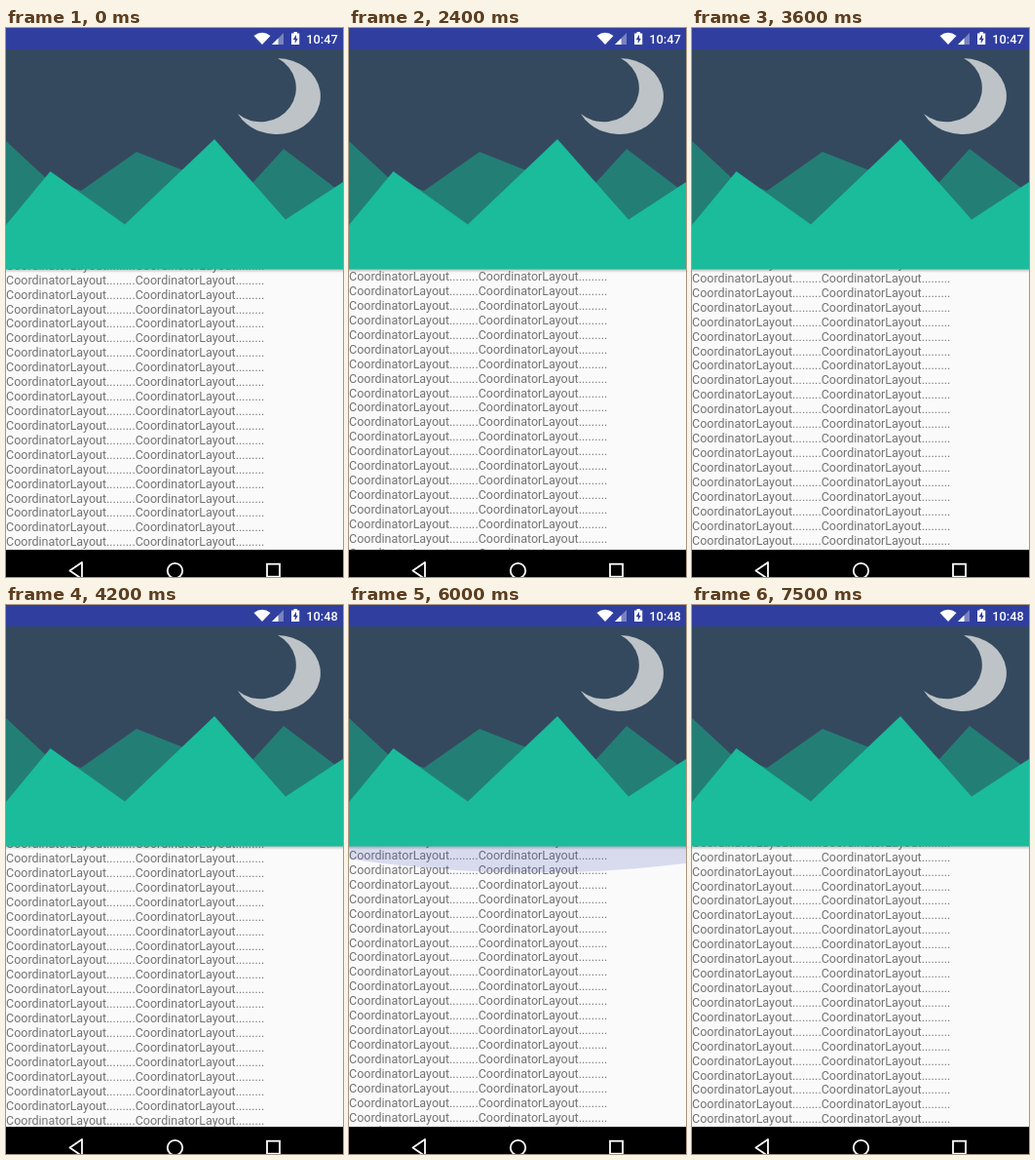
Animation, 346 px wide and 563 px high, one loop 8.7 s. Source, as an HTML page:

```html
<!DOCTYPE html>
<html lang="en">
<head>
<meta charset="utf-8">
<title>Scrolling list under a fixed header</title>
<style>
  html, body { margin: 0; width: 100%; height: 100%; overflow: hidden; background: #fafafa; }
  svg { display: block; width: 346px; height: 563px; }
  text { font-family: Roboto, sans-serif; white-space: pre; }
  #rows text { font-size: 12.5px; fill: #737373; }
</style>
</head>
<body>
<svg viewBox="0 0 346 563">
  <defs>
    <clipPath id="view"><rect y="247" width="346" height="288"/></clipPath>
    <linearGradient id="fade" x2="0" y2="1">
      <stop offset="0" stop-color="#000" stop-opacity=".26"/>
      <stop offset="1" stop-color="#000" stop-opacity="0"/>
    </linearGradient>
  </defs>
  <rect width="346" height="563" fill="#fafafa"/>

  <g clip-path="url(#view)">
    <g id="rows"></g>
    <ellipse id="glow" cx="190" rx="519" fill="#3f51b5"/>
  </g>
  <rect y="247" width="346" height="4" fill="url(#fade)"/>

  <!-- header picture -->
  <rect y="21" width="346" height="226" fill="#34495e"/>
  <path fill="#bdc3c7" d="M279 31A45 39 0 1 1 238 88A36.300 34.800 0 1 0 279 31Z"/>
  <path fill="#237f76" d="M0 116L40 153L77 167L134 127L182 146L254 158L285 124L346 170V247H0Z"/>
  <path fill="#1abc9c" d="M0 202L45.500 147L122 201.500L214 114L287 196.500L346 158V247.500H0Z"/>

  <!-- status bar -->
  <rect width="346" height="22" fill="#303f9f"/>
  <g fill="#fff">
    <path d="M254.500 8Q263 1.500 271.500 8L263 17Z"/>
    <path d="M285 5V17H273Z" opacity=".35"/>
    <path d="M279.500 10.500V17H273Z"/>
    <path d="M295.500 4h3.500v1.500h2.200v11.500h-8.200v-11.500h2.500Z"/>
    <path d="M298 6.800L294.700 12H296.700V16L299.800 10.700H298Z" fill="#303f9f"/>
    <text id="clock" x="308.300" y="15.800" font-size="12.8" font-weight="500"></text>
  </g>

  <!-- navigation bar -->
  <rect y="535.150" width="346" height="28" fill="#000"/>
  <g fill="none" stroke="#fff" stroke-width="1.8">
    <path d="M78 548V565L65.500 556.500Z" stroke-linejoin="round"/>
    <circle cx="173.500" cy="556.500" r="7.700"/>
    <rect x="268" y="549.700" width="13" height="13"/>
  </g>
</svg>
<script>
const LOOP = 8700, STEP = 100, PITCH = 14.92, BASE = 262.7;
const TOP = 247, BOTTOM = 535, RADIUS = 519, HEIGHT = 69.5;
const $ = id => document.getElementById(id);

// start ms, end ms, distance from the end of the list on arrival
const flings = [
  [2200, 2700, 157.7],
  [3000, 3900, 565.8],
  [3900, 4800, 1000],
  [4800, 5500, 1413.4],
  [5700, 6000, 1505.2],
  [6000, 6600, 0]
];

const glows = [
  { start: 1300, end: 2200, size: .69, alpha: .14, bottom: true },
  { start: 5800, end: 6300, size: .4, alpha: .185, bottom: false },
  { start: 6600, end: 7500, size: .69, alpha: .14, bottom: true }
];

const rows = Array.from({ length: 22 }, () => {
  const row = document.createElementNS("http://www.w3.org/2000/svg", "text");
  row.textContent = ("CoordinatorLayout" + ".".repeat(9)).repeat(2);
  return $("rows").appendChild(row);
});

const progress = (t, start, end) => Math.min(1, Math.max(0, (t - start) / (end - start)));
const easeOut = p => 1 - (1 - p) ** 2;

function scrollAt(t) {
  return flings.reduce((pos, [start, end, to]) =>
    pos + (to - pos) * easeOut(progress(t, start, end)), 0);
}

function drawGlow(t) {
  const glow = glows.find(g => t > g.start && t < g.end);
  $("glow").setAttribute("opacity", 0);
  if (!glow) return;
  // quick swell, slow fade
  const swell = Math.sin(Math.PI * progress(t, glow.start, glow.end) ** .65);
  const scale = glow.size * swell, depth = scale * (HEIGHT - RADIUS);
  $("glow").setAttribute("ry", RADIUS * scale);
  $("glow").setAttribute("cy", glow.bottom ? BOTTOM - depth : TOP + depth);
  $("glow").setAttribute("opacity", glow.alpha * swell ** 2);
}

function draw(now) {
  const t = Math.floor(now % LOOP / STEP) * STEP;
  const shift = scrollAt(t) % PITCH;
  rows.forEach((row, i) => row.setAttribute("y", Math.round(BASE + shift + (i - 2) * PITCH)));
  drawGlow(t);
  $("clock").textContent = t < 3800 ? "10:47" : "10:48";
}

const begin = performance.now();
function tick() {
  draw(performance.now() - begin);
  requestAnimationFrame(tick);
}
tick();
</script>
</body>
</html>
```
